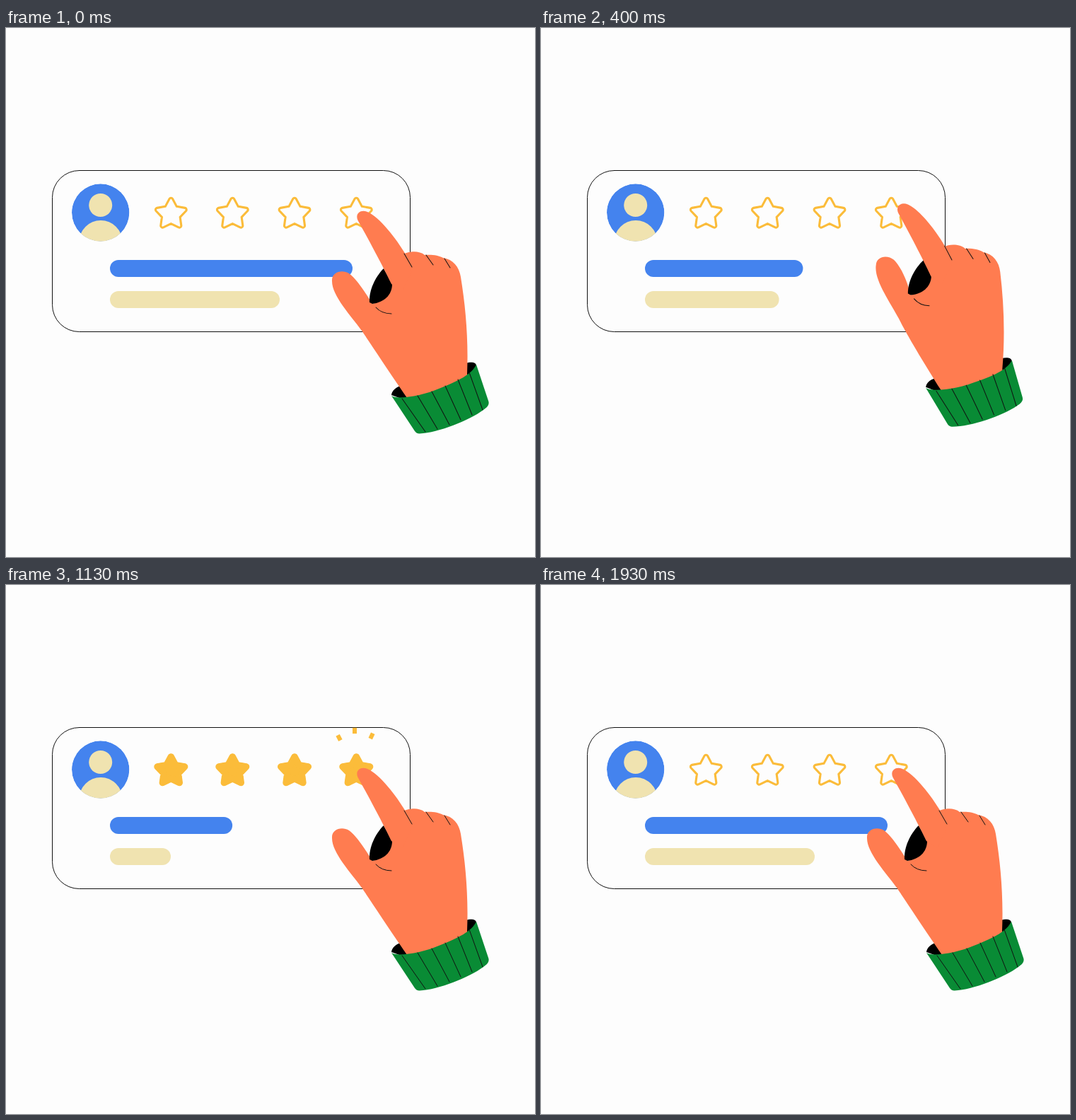
Animation of 748 by 748 pixels, one loop 1.96 s. Source, as an HTML page:

```html
<!DOCTYPE html>
<html lang="en">
<head>
<meta charset="utf-8">
<title>Star rating</title>
<style>
  html, body { margin: 0; width: 100%; height: 100%; overflow: hidden; background: #fdfdfd; }
  svg { display: block; width: 100%; height: 100%; }
  .blue { fill: #4483ee; }
  .sand { fill: #f0e3b0; }
  .line { fill: none; stroke: #111; stroke-width: 1; stroke-linecap: round; }
  .skin { fill: #ff7c50; }
  .gold { fill: #fbbc3a; stroke: #fbbc3a; stroke-linejoin: round; }
  .hole { fill: #fdfdfd; stroke: #fdfdfd; stroke-linejoin: round; }
</style>
</head>
<body>
<svg viewBox="0 0 748 748">
  <clipPath id="round"><circle cx="133.7" cy="261" r="40.7"/></clipPath>
  <rect class="line" x="65.5" y="201.5" width="506" height="228" rx="38"/>
  <g clip-path="url(#round)">
    <circle class="blue" cx="133.7" cy="261" r="40.7"/>
    <circle class="sand" cx="133.7" cy="250.5" r="16.5"/>
    <circle class="sand" cx="134" cy="302.5" r="30.5"/>
  </g>
  <rect id="bar1" class="blue" x="147" y="328" height="24" rx="12"/>
  <rect id="bar2" class="sand" x="147" y="372" height="24" rx="12"/>
  <g id="stars"></g>
  <g id="sparks" stroke="#fbbc3a" stroke-width="6"></g>

  <g id="hand">
    <path d="M545 519C546 510 556 505 570 503L650 474C657 472 664 472 665 477L655 500L570 528Z"/>
    <path id="palm" class="skin"/>
    <path d="M514 388C513 371 522 352 534 340L546 362C546 378 534 388 518 390Z"/>
    <path id="finger" class="skin" d="M497.500 272C493 262 502 256 511 260C528 267 552 298 565 320L574 345L560 372L545 362C540 351 520 312 497.500 272Z"/>
    <path class="line" d="M523 395Q531 404 545 404M563 319L574 338M594 321L604 335M620 326L628 339"/>
    <path fill="#098b35" d="M545 520C552 526 590 520 612 510C640 499 658 490 665 476L682 527C684 532 681 536 675 540C655 555 612 572 585 573.5Q581 574 578 570Z"/>
    <path class="line" d="M560 524L593 571M582 520L610 567M602 514L627 561M621 506L643 554M639 497L659 547M655 487L674 540"/>
  </g>
</svg>
<script>
const LOOP = 1960;
const $ = id => document.getElementById(id);
const clamp = u => Math.min(1, Math.max(0, u));
const ramp = (t, a, b) => clamp((t - a) / (b - a));
const sine = u => (1 - Math.cos(Math.PI * u)) / 2;

// Cubic Bezier easing (.27, 0, .4, 1), solved by bisection
function ease(u) {
  let lo = 0, hi = 1;
  for (let i = 0; i < 24; i++) {
    const s = (lo + hi) / 2, r = 1 - s;
    const x = 3 * r * r * s * .27 + 3 * r * s * s * .4 + s ** 3;
    if (x < u) lo = s; else hi = s;
  }
  return lo * lo * (3 - 2 * lo);
}

// Keys are [time, ...values]; returns the values at time t
function pose(t, keys) {
  const i = keys.findIndex(k => k[0] > t);
  if (i < 0) return keys[keys.length - 1].slice(1);
  const a = keys[i - 1], b = keys[i], u = sine(ramp(t, a[0], b[0]));
  return a.slice(1).map((v, j) => v + (b[j + 1] - v) * u);
}

// time, hand angle, hand lift, finger angle, thumb angle
const handKeys = [
  [0, 0, 0, 0, 0],
  [110, -8, 2, -6, 2.7],
  [400, 2.5, -5, -2, 5.3],
  [590, -2, 0, -1, 0],
  [730, 0, 0, 0, 0]
];

// Palm and thumb form one outline; only the thumb's points turn
function palmPath(angle) {
  const a = angle * Math.PI / 180, c = Math.cos(a), s = Math.sin(a);
  const T = (x, y) => {
    const dx = x - 550, dy = y - 420;
    return `${550 + c * dx - s * dy} ${420 + s * dx + c * dy} `;
  };
  return 'M545 362L562 320C570 315 585 315 592 321C600 320 612 321 618 325' +
    'C632 327 641 338 643 352C650 395 654 440 652 489L655 500L575 530L567 523' +
    `C547 494 ${T(520, 453)} ${T(503, 428)}` +
    `C${T(488, 407)} ${T(461, 379)} ${T(461, 358)}` +
    `C${T(460, 345)} ${T(475, 341)} ${T(485, 347)}` +
    `C${T(496, 355)} ${T(508, 374)} 518 390C535 386 546 376 545 362Z`;
}

const starPoints = Array.from({ length: 10 }, (_, i) => {
  const r = i % 2 ? 10.6 : 20.2, a = i * Math.PI / 5;
  return [r * Math.sin(a), -r * Math.cos(a)].map(v => v.toFixed(2));
}).join(' ');
const star = (cls, width) =>
  `<polygon class="${cls}" points="${starPoints}" stroke-width="${width}"/>`;

const starX = [233.3, 320.3, 408, 495.3];
$('stars').innerHTML = starX.map(() =>
  `<g>${star('gold', 8.4)}${star('hole', 2.2)}${star('gold', 9.6)}</g>`).join('');
const stars = [...$('stars').children];

const sparkSpots = [[471, 216, -27], [493, 206, 0], [517, 213.5, 25]];
$('sparks').innerHTML = sparkSpots.map(([x, y, a]) =>
  `<line transform="translate(${x} ${y}) rotate(${a})"/>`).join('');
const sparks = [...$('sparks').children];

function setBar(t, id, full, short, out, back) {
  const u = ease(ramp(t, ...out)) - ease(ramp(t, ...back));
  $(id).setAttribute('width', full + (short - full) * u);
}

function draw(now) {
  const t = now % LOOP;
  setBar(t, 'bar1', 343, 170.5, [43, 762], [1092, 1776]);
  setBar(t, 'bar2', 240, 86, [155, 1025], [1130, 1860]);

  stars.forEach((el, i) => {
    const press = i === 3 ? sine(ramp(t, 640, 770)) - sine(ramp(t, 800, 940)) : 0;
    el.setAttribute('transform', `translate(${starX[i]} 263.2) scale(${1 - .2 * press})`);
    const start = 650 + i * 125;
    const fill = ramp(t, start, start + 90) - ramp(t, 1680, 1880);
    el.lastChild.setAttribute('opacity', fill);
  });

  const half = 12 * (sine(ramp(t, 970, 1050)) - sine(ramp(t, 1070, 1172)));
  sparks.forEach(el => {
    el.setAttribute('y1', -half);
    el.setAttribute('y2', half);
  });

  const [angle, lift, finger, thumb] = pose(t, handKeys);
  $('hand').setAttribute('transform', `translate(0 ${lift}) rotate(${angle} 690 495)`);
  $('finger').setAttribute('transform', `rotate(${finger} 575 335)`);
  $('palm').setAttribute('d', palmPath(thumb));
}

const begin = performance.now();
function tick() {
  draw(performance.now() - begin);
  requestAnimationFrame(tick);
}
tick();
</script>
</body>
</html>
```
